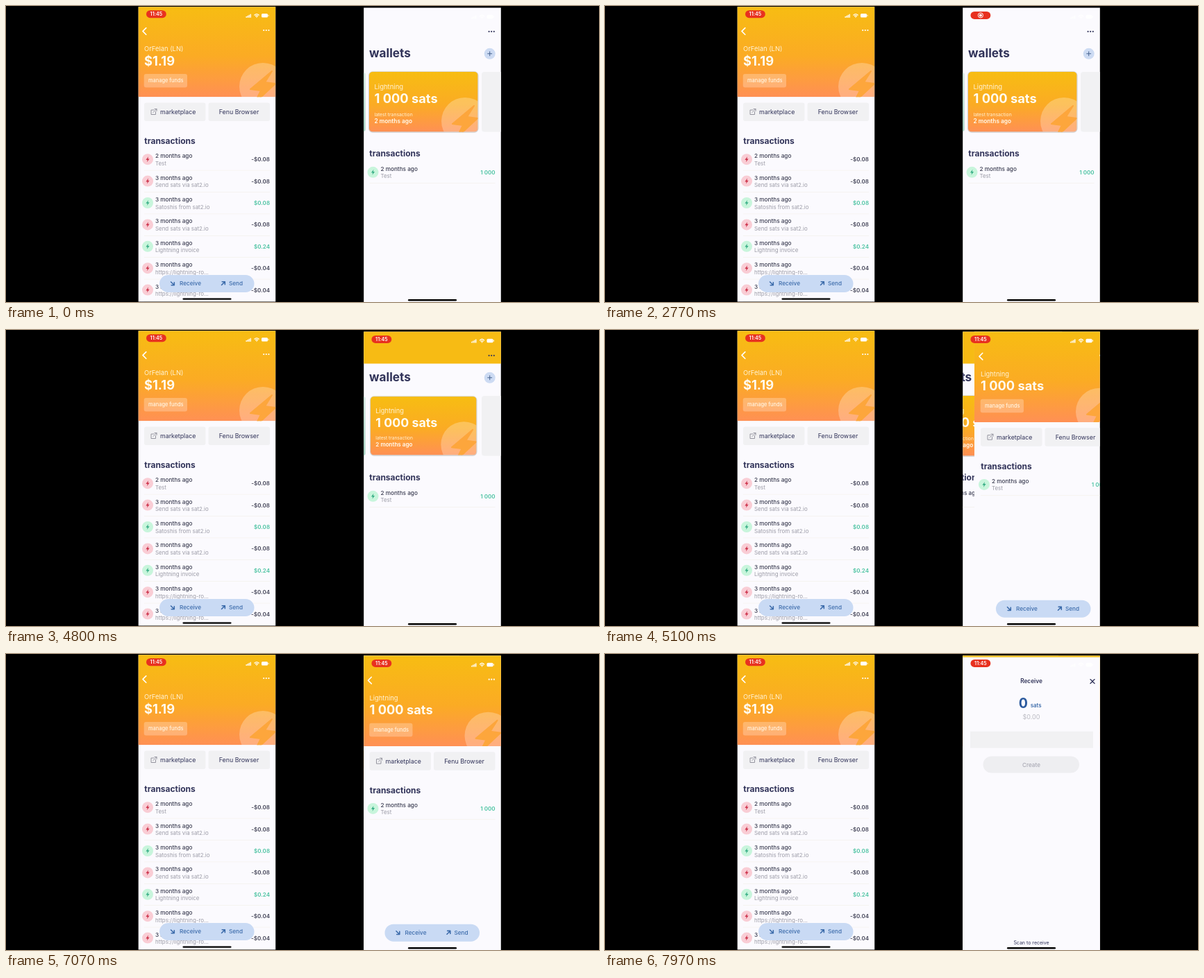
These frames come from a looping animation (854 px wide and 427 px high, 8000 ms). An HTML page:

```html
<!DOCTYPE html>
<html lang="en">
<head>
<meta charset="utf-8">
<title>Wallet demo</title>
<style>
  html, body { margin: 0; width: 100%; height: 100%; overflow: hidden; background: #000; }
  svg { display: block; width: 100vw; height: 100vh; font-family: Inter, Roboto, sans-serif; }
</style>
</head>
<body>
<svg id="stage" viewBox="0 0 854 427"></svg>
<script>
const LOOP = 8000;
const DARK = '#32345a', INK = '#3a3c50', MUTED = '#9b9ba6', GREEN = '#4cc3a2', BLUE = '#3d6cab';
const PAPER = '#fbfafe', PALE = '#f1f1f3', SKY = '#c9daf4', CREAM = '#fff3d6', SNOW = '#fffbf0';

const text = (x, y, size, fill, str, weight = 400, anchor = 'start') =>
  `<text x="${x}" y="${y}" font-size="${size}" fill="${fill}" font-weight="${weight}" text-anchor="${anchor}">${str}</text>`;
const rect = (x, y, w, h, fill, r = 0, extra = '') =>
  `<rect x="${x}" y="${y}" width="${w}" height="${h}" rx="${r}" fill="${fill}" ${extra}/>`;
const circle = (x, y, r, fill, extra = '') =>
  `<circle cx="${x}" cy="${y}" r="${r}" fill="${fill}" ${extra}/>`;
const line = (d, color, width = 1) =>
  `<path d="${d}" fill="none" stroke="${color}" stroke-width="${width}" stroke-linecap="round" stroke-linejoin="round"/>`;
const dots = (x, y, fill) => [-3.6, 0, 3.6].map(d => circle(x + d, y, 1.1, fill)).join('');

const bigBolt = (x, y) => circle(x, y, 34, '#fff', 'opacity=".26"') +
  `<path transform="translate(${x} ${y})" d="M13-22L-18 4L-3 6L-12 24L18-4L3-6Z" fill="#fda63c" stroke="#fda63c" stroke-width="2" stroke-linejoin="round"/>`;

function row(x, y, age, note, amount, right) {
  const plus = amount[0] !== '-';
  return circle(x + 5, y, 8, plus ? '#c8f5dc' : '#f9cdd5') +
    `<path transform="translate(${x + 5} ${y})" d="M1-4L-2.6.8H-.3L-1 4L2.6-.8H.3Z" fill="${plus ? '#37ae86' : '#cc3049'}"/>` +
    text(x + 16, y - 2, 8.2, INK, age + ' months ago', 500) +
    text(x + 16, y + 8.5, 7.9, MUTED, note) +
    text(right, y + 3, 8, plus ? GREEN : '#46475a', amount, 600, 'end') +
    rect(x, y + 15.6, right - x, .6, '#f2efe8');
}

function actions() {
  return rect(221, 388, 136.5, 25, SKY, 12.5) +
    line('M237.5 398L242 402.5M242.3 398.7V402.8H238.2', BLUE, 1.6) +
    text(250, 403, 8.2, BLUE, 'Receive', 500) +
    line('M310.5 402.5L315 398M311.2 397.7H315.3V401.8', BLUE, 1.6) +
    text(321, 403, 8.2, BLUE, 'Send', 500);
}

function wallet(id, name, balance, rows) {
  return rect(190, 0, 200, 428, PAPER) +
    `<clipPath id="${id}"><rect x="190" y="0" width="198.5" height="131.3"/></clipPath>` +
    `<g clip-path="url(#${id})">${rect(190, 0, 200, 131.3, 'url(#sun)')}${bigBolt(370, 116)}</g>` +
    line('M201.8 31.6L197 36.4L201.8 41.2', '#fff', 1.6) + dots(374.8, 35, '#fff') +
    text(199, 65, 9.4, CREAM, name) +
    text(199, 85.5, 18.3, SNOW, balance, 700) +
    rect(198.7, 98, 62.3, 19.5, '#fff', 3, 'opacity=".25"') +
    text(205, 110.2, 7.4, '#fff6e4', 'manage funds', 500) +
    rect(199, 139.5, 88.5, 26.5, PALE, 3) + rect(291.5, 139.5, 88.5, 26.5, PALE, 3) +
    line('M213 150H209V156.5H215.5V152.5M212 153.5L217 148.5M214 148.5H217V151.5', '#8b8b96', .9) +
    text(222, 156, 8.8, DARK, 'marketplace') +
    text(335.5, 156, 8.9, DARK, 'Fenu Browser', 400, 'middle') +
    text(199.3, 199, 12, DARK, 'transactions', 700) +
    rows.map((r, i) => row(199, 221.2 + i * 31.4, ...r, 380)).join('') + actions();
}

function home() {
  return rect(515, 2, 198, 426, PAPER) + text(523, 74.3, 17.2, DARK, 'wallets', 700) +
    circle(696.7, 68.8, 8, '#cddbf3') + line('M693.7 68.8H699.7M696.7 65.8V71.8', '#44628f', 1) +
    rect(510, 96, 7.5, 85, 'url(#mint)', 3) + rect(685, 95, 40, 86.5, PALE, 4) +
    `<g id="card">${rect(522, 94.2, 158.5, 88.6, '#b9b4b0', 6, 'opacity=".6"')}
     <clipPath id="cardClip">${rect(523, 95, 156.5, 86.5, '#000', 5)}</clipPath>
     <g clip-path="url(#cardClip)">${rect(523, 95, 156.5, 86.5, 'url(#sun)')}${bigBolt(661, 166)}</g>` +
    text(530.5, 120, 9.5, CREAM, 'Lightning') +
    text(530.5, 140.3, 18.3, SNOW, '1 000 sats', 700) +
    text(530.5, 159, 6.8, CREAM, 'latest transaction') +
    text(530.5, 168.6, 8.3, SNOW, '2 months ago', 600) + '</g>' +
    text(523.3, 217.2, 12, DARK, 'transactions', 700) +
    row(523.5, 239.8, 2, 'Test', '1 000', 704.5);
}

function receive() {
  return rect(515, 2, 198, 430, PAPER) +
    text(614, 39.6, 8.3, DARK, 'Receive', 600, 'middle') +
    line('M699 34L705 40M705 34L699 40', DARK, 1.3) +
    text(595.7, 75, 19.5, '#2c5a9e', '0', 700) + text(612.8, 74, 7.8, BLUE, 'sats', 600) +
    text(614, 91.2, 9, '#b9b9c0', '$0.00', 400, 'middle') +
    rect(526, 109, 177, 24, PALE) + rect(544.5, 145, 138.5, 24, '#eeeef1', 12) +
    text(614, 160, 8.1, '#a9a9b4', 'Create', 500, 'middle') +
    text(614, 416.3, 7, DARK, 'Scan to receive', 400, 'middle');
}

const status = () =>
  [0, 1, 2, 3].map(i => rect(345.5 + i * 2, 15 - i * 1.1, 1.4, 1.8 + i * 1.1, '#fff')).join('') +
  line('M358 13Q361 10.2 364 13M359.5 14.6Q361 13.2 362.5 14.6', '#fff', 1.3) + circle(361, 16, .8, '#fff') +
  rect(368, 11, 9, 5.6, '#fff', 1.5) + rect(377.6, 12.7, .9, 2.2, '#fff');
const pill = rect(202, 6.2, 28.8, 11, '#e8311f', 5.5);
const clock = text(216.4, 14.3, 7.2, '#fff', '11:45', 600, 'middle');
const recIcon = circle(216.4, 11.7, 3.6, 'none', 'stroke="#fff"') + circle(216.4, 11.7, 2, '#fff');
const bar = rect(254.5, 421.4, 70, 2.4, '#000', 1.2);

const history = [
  [2, 'Test', '-$0.08'],
  [3, 'Send sats via sat2.io', '-$0.08'],
  [3, 'Satoshis from sat2.io', '$0.08'],
  [3, 'Send sats via sat2.io', '-$0.08'],
  [3, 'Lightning invoice', '$0.24'],
  [3, 'https://lightning-ro...', '-$0.04'],
  [3, 'https://lightning-ro...', '-$0.04']
];

const stage = document.getElementById('stage');
stage.innerHTML = `
  <defs>
    <linearGradient id="sun" x2="0" y2="1">
      <stop stop-color="#f7bd12"/><stop offset=".55" stop-color="#fbab24"/><stop offset="1" stop-color="#ff9054"/>
    </linearGradient>
    <linearGradient id="mint" x2="0" y2="1"><stop stop-color="#cfe6dd"/><stop offset="1" stop-color="#9fcfbd"/></linearGradient>
    <clipPath id="leftPhone"><rect x="190.7" y="1.2" width="197.5" height="425.3"/></clipPath>
    <clipPath id="rightPhone"><rect x="515.2" y="2.4" width="197.6" height="425"/></clipPath>
  </defs>
  <rect width="854" height="427" fill="#000"/>
  <g clip-path="url(#leftPhone)">${wallet('headL', 'OrFelan (LN)', '$1.19', history)}${status()}${pill}${clock}${bar}</g>
  <g clip-path="url(#rightPhone)">
    <g id="home">${home()}</g>
    <g id="nav">${rect(515, 2, 198, 46.5, '#f7bb14')}</g>
    ${dots(699.2, 36.8, DARK)}
    <g id="detail">${wallet('headR', 'Lightning', '1 000 sats', [[2, 'Test', '1 000']])}</g>
    <g id="sheet">${receive()}</g>
    <g transform="translate(324.5 1.7)">${status()}
      <g id="pill">${pill}<g id="clock">${clock}</g><g id="rec">${recIcon}</g></g>${bar}
    </g>
  </g>`;

const part = {};
for (const id of ['home', 'card', 'nav', 'detail', 'sheet', 'pill', 'clock', 'rec'])
  part[id] = document.getElementById(id);

const clamp = v => Math.max(0, Math.min(1, v));
const show = (el, on) => el.setAttribute('visibility', on ? 'inherit' : 'hidden');
const move = (el, x, y) => el.setAttribute('transform', `translate(${x} ${y})`);

// Critically damped spring: share of the way still to go
function rest(t, start) {
  const k = Math.max(0, t - start) * .0144;
  return (1 + k) * Math.exp(-k);
}

const PUSH = 4820, RISE = 7470;

function draw(t) {
  const push = rest(t, PUSH);
  const press = clamp((t - 4620) / 120) * (1 - clamp((t - 4860) / 200));
  const s = 1 - .026 * press;
  part.card.setAttribute('transform', `translate(601.2 138.2) scale(${s}) translate(-601.2 -138.2)`);
  move(part.home, -60 * (1 - push), 0);
  move(part.detail, 324.5 + 198 * push, 1.7);
  move(part.sheet, 0, 425 * rest(t, RISE));
  show(part.nav, t >= PUSH - 40);
  show(part.detail, t >= PUSH);
  show(part.sheet, t >= RISE);
  show(part.pill, t >= 500);
  show(part.rec, t >= 500 && t < 3500);
  show(part.clock, t >= 3500);
}

const begin = performance.now();
function tick() {
  draw((performance.now() - begin) % LOOP);
  requestAnimationFrame(tick);
}
tick();
</script>
</body>
</html>
```
